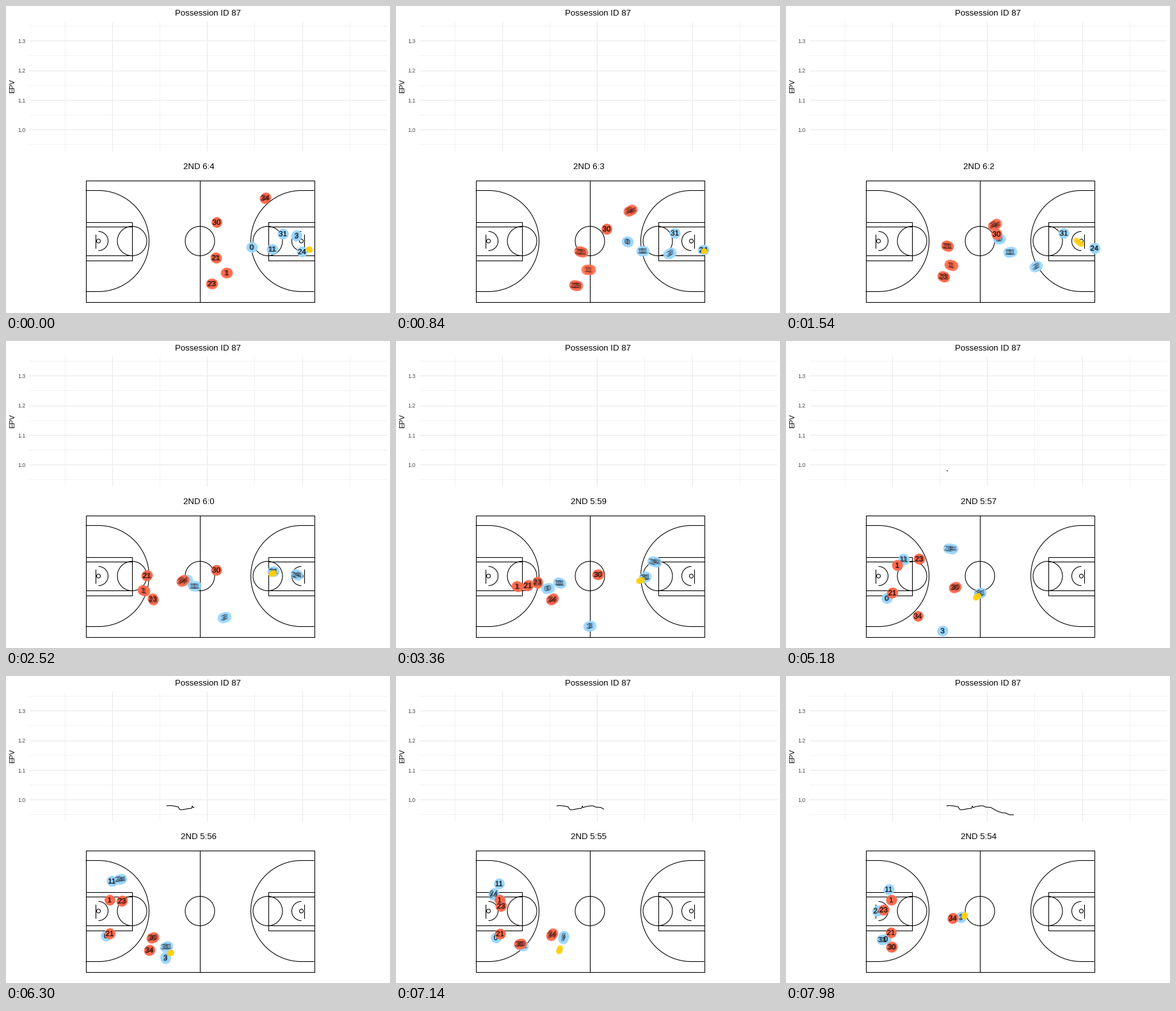
A matplotlib script for the animation above (8 s loop, 600 by 480 pixels).

```python
import matplotlib.pyplot as plt
import numpy as np
from matplotlib.animation import FuncAnimation
from matplotlib.collections import LineCollection, PathCollection
from matplotlib.textpath import TextPath
from matplotlib.transforms import Affine2D

W, H, DPI = 600, 480, 100
LOOP, TICK, STEP = 8000, 40, 140      # ms
SUB = 4                               # tracking samples per step
STEPS = LOOP // STEP + 1
RED, BLUE, GOLD = "#FF6B4E", "#9BD6FF", "#FFCF0A"
PT = 72 / DPI                         # points per pixel

plt.rcParams["font.family"] = "Liberation Sans"

# Way points (step, x, y) of each shirt number
RED_TEAM = {
    "34": [(0, 405, 300), (11, 326, 342), (18, 276, 374.5), (24, 244, 404),
           (37, 206, 430), (45, 224, 428.5), (57, 260.5, 378.5)],
    "30": [(0, 329, 338), (11, 329, 356.5), (18, 328.5, 358), (24, 315.5, 365),
           (37, 264, 385), (45, 229, 409), (57, 165, 423.5)],
    "21": [(0, 328, 393.5), (11, 252, 375), (18, 220, 366.5), (24, 206, 382),
           (37, 166, 393.5), (45, 162, 402.5), (57, 164, 401)],
    "1": [(0, 345, 417), (11, 258, 405), (18, 215, 390), (24, 189.5, 383.5),
          (37, 174, 350.5), (45, 162, 350), (57, 164.5, 350)],
    "23": [(0, 321.5, 434), (5, 288, 438), (11, 246, 423), (18, 229.5, 403.5),
           (24, 221, 377), (37, 208, 340.5), (45, 181, 351.5), (57, 152.5, 365.5)],
}
BLUE_TEAM = {
    "31": [(0, 432.5, 356), (11, 434, 355), (18, 417.5, 360), (24, 389, 369),
           (37, 303, 394), (45, 250.5, 423), (57, 150.5, 412)],
    "3": [(0, 454, 359), (3, 445, 373), (11, 390.5, 407), (18, 341, 432),
          (24, 302.5, 445.5), (37, 244.5, 453), (45, 249, 440.5), (57, 273.5, 377)],
    "24": [(0, 462.5, 384), (8, 483.5, 380), (11, 482, 378.5), (18, 454, 365.5),
           (24, 404, 345), (37, 257, 324.5), (45, 178.5, 317.5), (57, 143, 367)],
    "11": [(0, 416, 380), (11, 350, 384.5), (18, 294.5, 383), (24, 255.5, 378),
           (37, 184, 341), (45, 165.5, 320.5), (57, 160.5, 333.5)],
    "0": [(0, 384, 377), (11, 333, 364), (18, 281, 374), (24, 237, 386.5),
          (37, 157.5, 402), (45, 156, 406), (57, 156, 411)],
}
BALL = [(0, 473.5, 380), (2, 475, 384), (6, 481, 383), (9, 479, 384),
        (11, 457, 369), (13, 436, 357), (18, 416, 363), (24, 381.5, 374),
        (32, 332, 388), (37, 298, 399.5), (45, 257, 432.5), (50, 253, 433),
        (57, 278.5, 374)]

# Corners of the EPV curve in pixels
EPV = np.array([(251.3, 203), (256, 202.5), (264, 203.5), (270, 205), (271, 209),
                (276, 209), (284, 207.5), (290, 207), (291, 203), (292.5, 206),
                (295, 204.5), (304, 203), (308, 203), (312, 205), (320, 205.5),
                (326, 209), (332, 212), (338, 214), (343, 214), (349, 217),
                (356, 217)])
EPV_START, EPV_DX = 37 * SUB + 2, 1.285


def track(points):
    """Smooth path through the way points, one row per tracking sample."""
    p = np.array(points, float)
    k, xy = p[:, 0], p[:, 1:]
    slope = np.gradient(xy, k, axis=0)
    slope[[0, -1]] *= 0.5
    t = (np.arange(STEPS * SUB) - (SUB - 1) / 2) / SUB
    i = np.clip(np.searchsorted(k, t, side="right") - 1, 0, len(k) - 2)
    h = (k[i + 1] - k[i])[:, None]
    u = (t[:, None] - k[i][:, None]) / h
    return ((1 + 2 * u) * (1 - u) ** 2 * xy[i] + u * (1 - u) ** 2 * h * slope[i]
            + u * u * (3 - 2 * u) * xy[i + 1] + u * u * (u - 1) * h * slope[i + 1])


def arc(cx, cy, r, a=0, b=360):
    t = np.radians(np.linspace(a, b, 91))
    return np.column_stack([cx + r * np.cos(t), cy + r * np.sin(t)])


def half_court():
    cx, cy = 144.5, 367.5
    three = np.vstack([[(124.5, 288.5)], arc(cx, cy, 79, -90, 90), [(124.5, 446.5)]])
    return [three,
            [(124.5, 337.5), (196.5, 337.5), (196.5, 398), (124.5, 398)],
            [(124.5, 345), (196.5, 345)], [(124.5, 390), (196.5, 390)],
            arc(197, cy, 23), arc(cx, cy, 3), arc(cx, cy, 15, -90, 90),
            [(140, 356.5), (140, 378.5)]]


fig = plt.figure(figsize=(W / DPI, H / DPI), dpi=DPI, facecolor="white")
ax = fig.add_axes([0, 0, 1, 1])
ax.set(xlim=(0, W), ylim=(H, 0))
ax.axis("off")
pixels = Affine2D().scale(1 / DPI) + fig.dpi_scale_trans


def lines(segs, color, width, z):
    ax.add_collection(LineCollection(segs, colors=color, linewidths=width * PT, zorder=z),
                      autolim=False)


def label(x, y, s, px, color="black", **kw):
    kw = {"ha": "center", "va": "center_baseline", **kw}
    return ax.text(x, y, s, fontsize=px * PT, color=color, **kw)


# EPV panel
def rows(ys):
    return [[(36, y), (595, y)] for y in ys]


def cols(xs):
    return [[(x, 24), (x, 227)] for x in xs]


major_y = [54.2, 100.5, 146.8, 193.2]
lines(rows([31, 77.4, 123.7, 170, 216.4]) + cols([91.5, 239.5, 388, 536.5]),
      "#EBEBEB", 0.6, 0)
lines(rows(major_y) + cols([165.5, 314, 462.5]), "#EBEBEB", 1.2, 0)
for y, s in zip(major_y, ["1.3", "1.2", "1.1", "1.0"]):
    label(31, y + 0.5, s, 8.8, "#4D4D4D", ha="right")
label(315, 10.5, "Possession ID 87", 13.2)
label(10, 125, "EPV", 11, rotation=90, va="center")
clock = label(301, 250.5, "", 13.2)
curve, = ax.plot([], [], color="black", lw=1.07 * PT, zorder=1)

# Court
left = half_court()
right = [np.array([W + 6, 0]) + np.array(s) * [-1, 1] for s in left]
border = [(124.5, 272.5), (481.5, 272.5), (481.5, 462.5), (124.5, 462.5), (124.5, 272.5)]
lines(left + right + [border, [(303, 272.5), (303, 462.5)], arc(303, 367.5, 23)],
      "black", 1.07, 1)


def dots(color, size, z):
    return ax.scatter([], [], s=(size * PT) ** 2, c=color, alpha=0.8, linewidths=0, zorder=z)


def number(s, z):
    """Shirt number drawn once per sample, centred on the sample."""
    path = TextPath((0, 0), s, size=11.5)
    box = path.get_extents()
    path = path.transformed(Affine2D().translate(-(box.x0 + box.x1) / 2,
                                                 -(box.y0 + box.y1) / 2))
    marks = PathCollection([path], offsets=np.zeros((1, 2)), offset_transform=ax.transData,
                           facecolors="black", alpha=0.45, linewidths=0, zorder=z)
    marks.set_transform(pixels)
    return ax.add_collection(marks, autolim=False)


teams = []
for roster, color, z in ((BLUE_TEAM, BLUE, 3), (RED_TEAM, RED, 5)):
    paths = [track(p) for p in roster.values()]
    teams.append((dots(color, 16, z), paths, [number(s, z + 1) for s in roster]))
ball, ball_path = dots(GOLD, 9, 7), track(BALL)


def draw(tick):
    step = min((tick * TICK + TICK // 2) // STEP, STEPS - 1)
    now = slice(step * SUB, (step + 1) * SUB)

    for team, paths, marks in teams:
        spots = [p[now] for p in paths]
        team.set_offsets(np.vstack(spots))
        for mark, spot in zip(marks, spots):
            mark.set_offsets(spot)
    ball.set_offsets(ball_path[now])

    seconds = int(364.05 - 0.175 * step)
    clock.set_text(f"2ND {seconds // 60}:{seconds % 60}")

    count = max(0, now.stop - EPV_START)
    x = EPV[0, 0] + EPV_DX * np.arange(count)
    curve.set_data(x, np.interp(x, EPV[:, 0], EPV[:, 1]))
    return ()


anim = FuncAnimation(fig, draw, frames=LOOP // TICK, interval=TICK,
                     repeat=True, repeat_delay=0)
plt.show()
```
